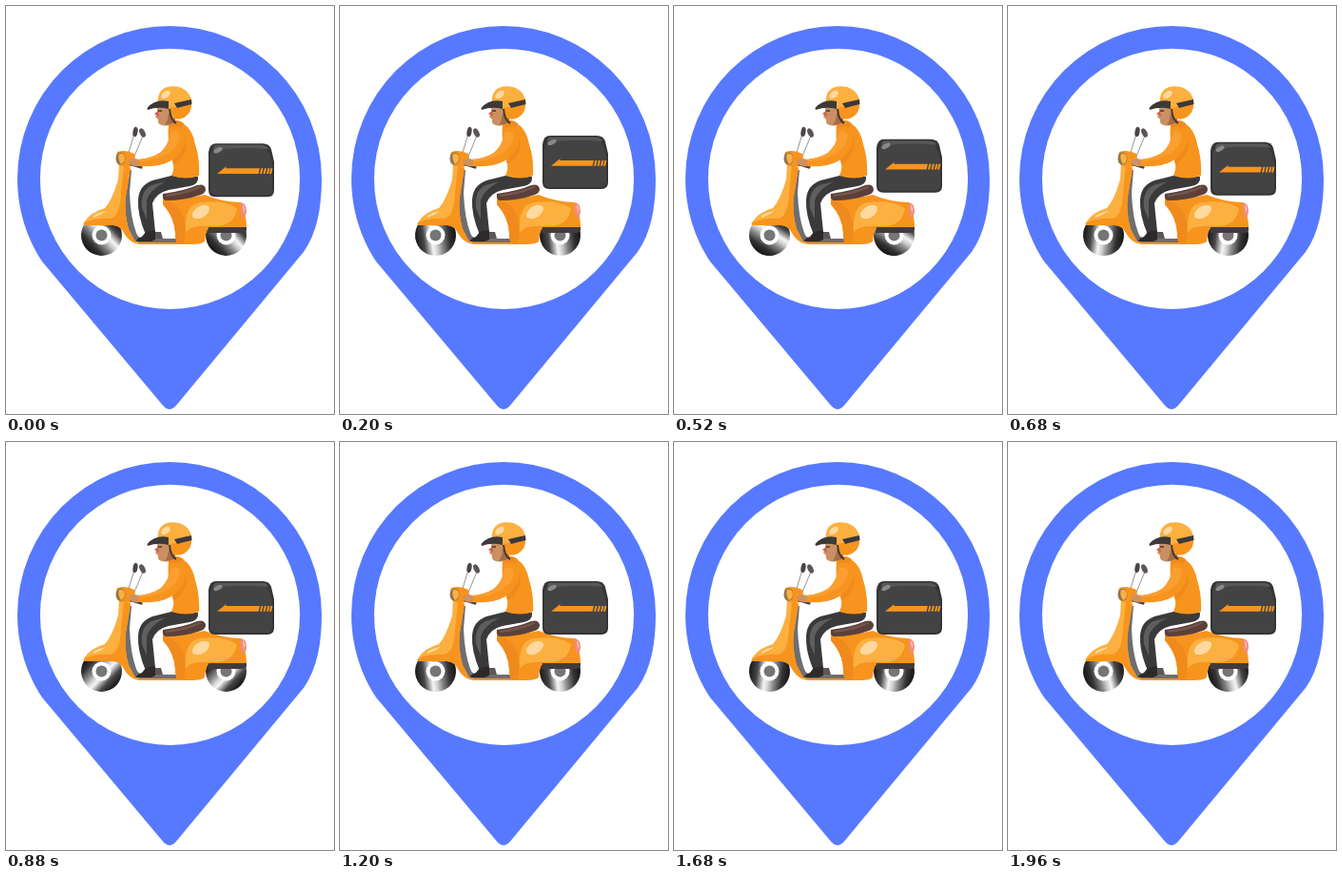
Animation, 345 px wide and 428 px high, one loop 2000 ms. Source, as an HTML page:

```html
<!DOCTYPE html>
<html lang="en">
<head>
<meta charset="utf-8">
<title>Delivery pin</title>
<style>
  html, body { margin: 0; width: 100%; height: 100%; overflow: hidden; background: #fff; }
  svg { display: block; width: 345px; height: 428px; }
  .light { fill: #fbb040; }
  .mid { fill: #f7941e; }
  .glow { fill: #ffd9a0; }
</style>
</head>
<body>
<svg viewBox="0 0 345 428">
  <defs>
    <linearGradient id="steel">
      <stop offset="0" stop-color="#171717"/>
      <stop offset=".2" stop-color="#484646"/>
      <stop offset=".4" stop-color="#f6f6f6"/>
      <stop offset=".5" stop-color="#d2d2d2"/>
      <stop offset=".64" stop-color="#858383"/>
      <stop offset=".82" stop-color="#343232"/>
      <stop offset="1" stop-color="#151515"/>
    </linearGradient>
    <g id="hub">
      <circle r="10" fill="#fff"/>
      <circle r="6" fill="#777576"/>
    </g>
  </defs>

  <!-- pin -->
  <path fill="#5779ff" d="M38 268C22 244 12 214 12 181A160 160 0 0 1 332 181C332 212 327 238 313 258L179 419Q172 427 165 419Z"/>
  <circle cx="172.5" cy="181.3" r="136.6" fill="#fff"/>

  <!-- wheels -->
  <g transform="translate(100.5 240.5)"><circle class="tyre" r="21.5" fill="url(#steel)"/><use href="#hub"/></g>
  <g transform="translate(231.5 240.5)"><circle class="tyre" r="21.5" fill="url(#steel)"/><use href="#hub"/></g>

  <!-- mirrors -->
  <path fill="none" stroke="#99928f" d="M128 157L135 134M134 160L144 136"/>
  <ellipse cx="136" cy="132" rx="2.5" ry="5.2" fill="#4a4444" transform="rotate(10 136 132)"/>
  <ellipse cx="143.5" cy="133" rx="2.8" ry="5" fill="#5c5656" transform="rotate(-25 143.5 133)"/>

  <!-- floor and shield lining -->
  <path fill="#6d6e71" d="M127 172L132 172 130 196Q131 222 137 238Q139 244 146 244H180V248H140Q131 247 128 238L122 205Z"/>
  <path class="mid" d="M133 246Q137 248 144 248H181V250H142Q136 250 133 246Z"/>

  <!-- rear body -->
  <path class="mid" d="M165 201Q188 203 209 198Q225 205 247 206Q253 219 253 232H214Q210 235 209 247Q206 250 196 250H181Q178 247 178 239Q178 223 165 208Z"/>
  <path fill="#f08a1c" d="M166 203Q184 208 187 224Q190 238 187 249H181Q178 246 178 238Q177 221 165 208Z"/>
  <path class="light" d="M189 238Q187 208 204 206Q229 203 241 211Q251 218 253 232H214L208 238Z"/>
  <path class="mid" d="M189 238Q193 229 218 231Q240 232 243 212Q251 219 253 232H214L208 238Z"/>
  <ellipse class="glow" cx="205" cy="216" rx="10" ry="6" transform="rotate(-32 205 216)"/>
  <path fill="#413c3b" d="M213 232H253V235Q252 238 248 238H212Z"/>
  <path fill="#ef8d81" d="M247 206Q253 207 253 215Q253 220 249 223Q246 214 247 206Z"/>
  <path fill="#f9c0b3" d="M249 208Q252 211 251 217Q249 214 249 208Z"/>

  <!-- seat -->
  <path fill="#5b403a" d="M165 197Q187 194 201 188Q209 186 210 192Q210 196 205 198Q188 204 168 204Q164 203 165 197Z"/>
  <path fill="#75564e" d="M168 198Q189 195 203 189L206 190Q190 198 168 200Z"/>

  <!-- leg -->
  <path fill="#3b3a3b" d="M174 178L202 179Q203 187 193 189L171 193Q158 196 154 207L157 237 147 240Q138 219 139 203Q140 188 154 183Z"/>
  <path fill="#5f5e5f" d="M143 212Q141 194 153 188L168 184Q151 193 148 204L148 224Z"/>
  <path fill="#2e2a2a" d="M147 237L156 235 159 241Q158 246 152 247H137Q137 244 143 242Z"/>
  <path fill="#5b5657" d="M157 237H163L165 244H157Z"/>

  <!-- front shield and fender -->
  <path class="light" d="M119 165Q126 165 131 169L126 200Q124 216 129 234L137 249Q130 247 125 239Q121 231 113 230H84Q80 230 82 227Q89 216 104 212Q112 203 118 182Z"/>
  <path class="mid" d="M124 168L131 170 126 200Q124 217 129 234L137 249Q129 247 124 238Q120 230 112 230H84Q81 230 83 227Q96 222 109 223Q120 222 121 196Z"/>
  <path class="glow" d="M92 220Q98 216 106 215Q100 219 92 222Z"/>

  <!-- headlamp and handle -->
  <path class="mid" d="M117 153Q126 150 135 155L137 166Q129 171 119 167Q114 163 117 153Z"/>
  <ellipse cx="120.5" cy="160" rx="5" ry="6.6" fill="#8e7554"/>
  <path class="light" d="M119 155Q125 154 125 160Q125 164 121 166Q117 160 119 155Z"/>
  <path stroke="#4b4545" stroke-width="3.2" stroke-linecap="round" d="M132 166L142 169"/>

  <!-- jacket -->
  <path class="mid" d="M171 122Q179 118 186 123Q196 129 199 145Q204 160 203 178Q190 183 174 178Q178 170 175 162Q169 145 171 122Z"/>
  <path fill="#f08a1c" d="M187 134Q193 145 187 155Q183 163 176 166L175 162Q186 152 187 134Z"/>
  <path class="mid" d="M174 132Q181 128 187 134Q191 142 185 151Q176 164 161 167Q150 169 140 168L139 161Q152 160 162 154Q170 147 172 137Z"/>
  <path fill="#fa9f30" d="M174 132Q181 129 183 137Q182 146 173 153Q160 162 140 163L139 161Q152 160 162 154Q170 147 172 137Z"/>
  <path fill="#ce9161" d="M140 161Q131 158 129 163Q130 169 140 168Z"/>
  <path fill="#f08a1c" d="M171 122Q179 117 187 123L184 128Q178 125 172 128Z"/>

  <!-- head -->
  <path fill="#c99063" d="M159 106H178V122Q171 127 164 125Q159 124 160 119L157 116 159 112Z"/>
  <path fill="#a86b45" d="M171 107H178V122Q172 125 167 125Q172 118 171 107Z"/>
  <path fill="#d65b53" d="M156 113L160 110 161 116Z"/>
  <path stroke="#403230" stroke-width="1.4" d="M160 110H164"/>
  <path class="light" d="M160 103Q158 87 172 84.5Q190 83 195 98Q197 111 187 117Q180 120 175 117Q170 114 171 106Z"/>
  <path class="mid" d="M177 106Q188 108 195 101Q196 112 187 117Q180 120 175 117Q171 114 172 107Z"/>
  <path fill="#3d3939" d="M177 102L195 98 195.5 103 180 107ZM148.5 107Q157 97 171 100L171 108Q160 105 149 109Z"/>
  <path fill="none" stroke="#3d3939" stroke-width="2" d="M172 108Q173 120 179 123"/>
  <ellipse class="glow" cx="168" cy="93" rx="5.5" ry="3.2" transform="rotate(-38 168 93)"/>

  <!-- cargo box, at rest -->
  <g id="box">
    <path fill="#353535" d="M221 146H270Q277 146 279 152L282 165V195Q282 202 275 202H220Q213 202 213 195V155Q214 146 221 146Z"/>
    <path fill="#434343" d="M222 151Q246 148 271 151Q276 152 278 160L280 168V194Q280 200 274 200H221Q215 200 215 194V160Q215 152 222 151Z"/>
    <path fill="#575757" d="M221 147.5H269Q275 148 276 152Q248 149 218 153Q218 148 221 147.5Z"/>
    <ellipse cx="223" cy="153" rx="5" ry="2.4" fill="#8a8989" transform="rotate(-28 223 153)"/>
    <path class="mid" d="M222 177.8L232 169.8 231 172H267L265.5 177.8Z"/>
    <path fill="none" stroke="#f7941e" stroke-width="2" d="M269.5 172L268 177.8M273 172L271.5 177.8M276.5 172L275 177.8M279.5 172L278 177.8"/>
  </g>
</svg>
<script>
  const LOOP = 2000, STEP = 40, TURN = 500, LEVEL = 190;
  // hop: [start, end, height]
  const hops = [[-20, 420, 10], [420, 720, 7], [720, 880, 2], [880, 1100, 0.8]];
  const box = document.getElementById('box');
  const tyres = document.querySelectorAll('.tyre');

  function lift(t) {
    const hop = hops.find(([a, b]) => t >= a && t < b);
    if (!hop) return 0;
    const [a, b, height] = hop;
    const p = (t - a) / (b - a);
    return 4 * height * p * (1 - p);
  }

  function draw(now) {
    const t = Math.floor((now % LOOP) / STEP) * STEP;
    const angle = (LEVEL - t) * 360 / TURN;
    box.setAttribute('transform', `translate(0 ${-lift(t)})`);
    tyres.forEach(tyre => tyre.setAttribute('transform', `rotate(${angle})`));
  }

  const start = performance.now();
  function tick() {
    draw(performance.now() - start);
    requestAnimationFrame(tick);
  }
  tick();
</script>
</body>
</html>
```
